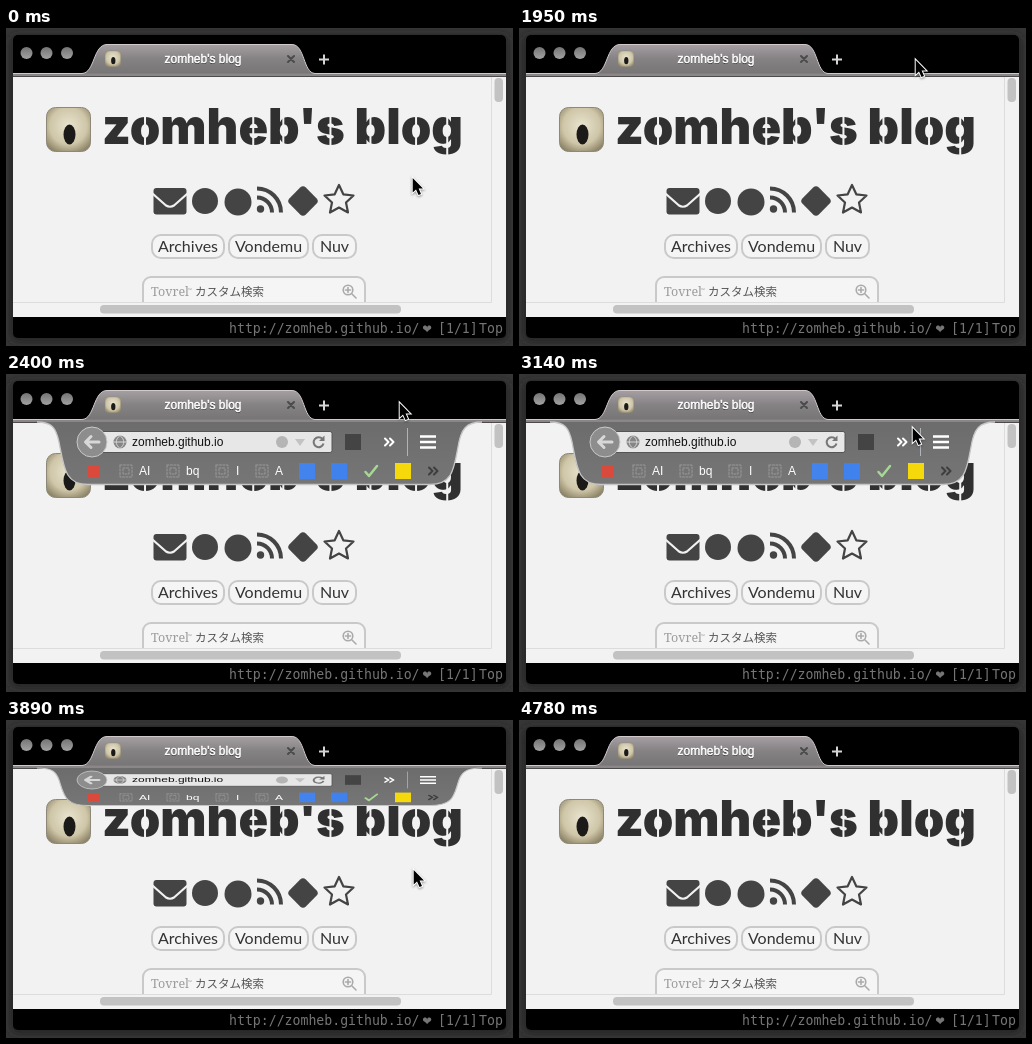
An HTML page that plays this animation: 507 px wide and 318 px high, repeating every 5.69 s.

```html
<!DOCTYPE html>
<html lang="ja">
<head>
<meta charset="utf-8">
<title>Hidden toolbar</title>
<style>
  html, body { margin: 0; width: 100%; height: 100%; overflow: hidden; background: #343434; }
  svg { display: block; width: 507px; height: 318px; }
  text { white-space: pre; }
  .sans { font-family: "Liberation Sans", Arial, sans-serif; }
  .title { font: 900 49px Inter, sans-serif; fill: #303030; }
  .button { font: 16px Lato, sans-serif; fill: #333; text-anchor: middle; }
  .outline { fill: #f5f5f5; stroke: #c9c9c9; stroke-width: 2; }
  .status { font: 13.2px "DejaVu Sans Mono", monospace; fill: #757575; }
  .bookmark { font-size: 12px; fill: #fff; }
  .line { fill: none; stroke-linecap: round; stroke-linejoin: round; }

  .toolbar, .cursor { animation: 5690ms step-end infinite; }
  .toolbar { animation-name: toolbar; transform-origin: 0 0; }
  .cursor { animation-name: cursor; filter: drop-shadow(0 1px 1px #0006); }

  @keyframes toolbar {
    0% { transform: scaleY(0); }
    36.90% { transform: scaleY(.7); }
    39.54% { transform: scaleY(1); }
    65.72% { transform: scaleY(.93); }
    68.36% { transform: scaleY(.6); }
    71.00% { transform: scaleY(.18); }
    73.63%, 100% { transform: scaleY(0); }
  }
  @keyframes cursor {
    0% { transform: translate(406px, 149px); }
    26.36% { transform: translate(406px, 140px); }
    28.99% { transform: translate(403px, 79px); }
    31.63% { transform: translate(399px, 44px); }
    34.27% { transform: translate(396px, 31px); }
    36.90% { transform: translate(396px, 28px); }
    42.17% { transform: translate(393px, 28px); }
    55.18% { transform: translate(393px, 53px); }
    57.82% { transform: translate(401px, 72px); }
    60.45% { transform: translate(405px, 131px); }
    63.09% { transform: translate(407px, 140px); }
    65.72% { transform: translate(407px, 149px); }
    76.09% { transform: translate(452px, 255px); }
    78.73% { transform: translate(467px, 292px); }
    81.37% { transform: translate(468px, 297px); visibility: visible; }
    84.00%, 100% { transform: translate(468px, 297px); visibility: hidden; }
  }
</style>
</head>
<body>
<svg viewBox="0 0 507 318">
  <defs>
    <linearGradient id="tab" x2="0" y2="1">
      <stop offset="0" stop-color="#a59fa2"/><stop offset=".5" stop-color="#858284"/><stop offset="1" stop-color="#777576"/>
    </linearGradient>
    <linearGradient id="panel" x2="0" y2="1">
      <stop offset="0" stop-color="#6c6c6c"/><stop offset="1" stop-color="#767676"/>
    </linearGradient>
    <linearGradient id="lamp" x2="0" y2="1">
      <stop offset="0" stop-color="#747474"/><stop offset="1" stop-color="#a2a2a2"/>
    </linearGradient>
    <radialGradient id="photo" cy=".42" r=".7">
      <stop offset="0" stop-color="#e9e4d0"/><stop offset=".6" stop-color="#cfc6a8"/><stop offset="1" stop-color="#81775c"/>
    </radialGradient>
    <filter id="shade" x="-10%" y="-10%" width="120%" height="120%"><feGaussianBlur stdDeviation="4"/></filter>
    <clipPath id="page"><rect x="7" y="49" width="479" height="225"/></clipPath>
    <g id="avatar">
      <rect width="44" height="44" rx="9" fill="url(#photo)" stroke="#8d8878"/>
      <ellipse cx="23" cy="27" rx="6" ry="10" fill="#1c1a18"/>
    </g>
    <g id="blank" class="line" stroke="#999" stroke-dasharray="2 1.5">
      <rect x="-6" y="-6" width="12" height="12"/><rect x="-3" y="-3" width="6" height="6"/>
    </g>
    <path id="more" class="line" stroke-width="2" d="M-5-3.5L-1.5 0L-5 3.5M0-3.5L3.5 0L0 3.5"/>
  </defs>

  <rect width="507" height="318" fill="#363636"/>
  <rect x="5" y="8" width="497" height="305" rx="6" fill="#202020" filter="url(#shade)"/>
  <rect x="7" y="7" width="493" height="303" rx="5"/>

  <!-- Title bar -->
  <g fill="url(#lamp)">
    <circle cx="20.5" cy="25" r="6"/><circle cx="40.5" cy="25" r="6"/><circle cx="61" cy="25" r="6"/>
  </g>
  <rect x="7" y="45" width="493" height="3" fill="#8b8688"/>
  <path d="M7 45.5H76C89 45 87 16.5 101 16.5H286C299 16.5 297 45 309 45.5H500" fill="url(#tab)" stroke="#d0c8cb"/>
  <rect x="7" y="48" width="493" height="1" fill="#4c4a4b"/>
  <use href="#avatar" transform="translate(99 23) scale(.36)"/>
  <g class="sans" font-size="12" text-anchor="middle">
    <text x="197" y="36" fill="#333">zomheb's blog</text>
    <text x="197" y="35" fill="#fff" stroke="#fff" stroke-width=".5">zomheb's blog</text>
  </g>
  <path class="line" d="M282 28l6 6m0-6l-6 6" stroke="#4b4b4b" stroke-width="2"/>
  <path d="M313 31.5h10m-5-5v10" stroke="#d5d5d5" stroke-width="2"/>

  <!-- Page -->
  <rect x="7" y="49" width="493" height="240" fill="#f2f2f2"/>
  <g clip-path="url(#page)">
    <use href="#avatar" x="40.5" y="79.5"/>
    <text class="title" id="title" x="96" y="115.5">zomheb's blog</text>
    <g id="slits" fill="#f2f2f2"></g>

    <g fill="#444">
      <rect x="147.5" y="160" width="33" height="26.5" rx="3"/>
      <path class="line" d="M147 166L160 177.5Q164 180 168 177.5L181 166" stroke="#f2f2f2" stroke-width="2.2"/>
      <circle cx="199" cy="173" r="13"/>
      <circle cx="232" cy="174" r="13.5"/>
      <circle cx="254.5" cy="181" r="3.7"/>
      <path d="M251 169.5a15 15 0 0 1 15 15M251 160.5a24 24 0 0 1 24 24" fill="none" stroke="#444" stroke-width="4"/>
      <rect x="285.5" y="161.500" width="23" height="23" rx="4" transform="rotate(45 297 173)"/>
      <path class="line" d="M333 157l4.3 9.3 10.2 1.2-7.5 7 2 10-9-5-9 5 2-10-7.5-7 10.2-1.2z" stroke="#444" stroke-width="2.2"/>
    </g>

    <g class="outline">
      <rect x="146" y="207" width="72" height="23" rx="9"/>
      <rect x="223" y="207" width="79" height="23" rx="9"/>
      <rect x="307" y="207" width="43" height="23" rx="9"/>
      <rect x="137" y="249" width="222" height="40" rx="8"/>
    </g>
    <g class="button">
      <text x="182" y="224">Archives</text><text x="262.5" y="224">Vondemu</text><text x="328.5" y="224">Nuv</text>
    </g>
    <text x="145" y="268" font-size="12.5" font-family="'Noto Serif', serif" fill="#9c9c9c">Tovrel</text>
    <text x="182" y="264" font-size="5" font-family="'Noto Sans', sans-serif" fill="#9c9c9c">™</text>
    <text x="189" y="267.5" font-size="11.5" font-family="'Noto Sans CJK JP', 'Noto Sans CJK', sans-serif" fill="#555">カスタム検索</text>
    <g class="line" stroke="#aaa" stroke-width="1.6">
      <circle cx="342" cy="262" r="4.8"/><path d="M346 266l4 4M339.5 262h5m-2.5-2.5v5"/>
    </g>
  </g>
  <path d="M7 274.5H485.5V49" fill="none" stroke="#dcdcdc"/>
  <g fill="#c2c2c2">
    <rect x="488.5" y="50" width="8.5" height="24" rx="4"/><rect x="94" y="277" width="301" height="8.5" rx="4"/>
  </g>

  <g class="status">
    <text x="223" y="305">http://zomheb.github.io/</text>
    <text x="416.5" y="305" font-size="15">❤</text>
    <text x="432" y="305">[1/1]</text>
    <text x="473" y="305">Top</text>
  </g>

  <!-- Drop-down toolbar, drawn from its top edge -->
  <g transform="translate(0 48)"><g class="toolbar"><g transform="translate(0 -48)">
    <path d="M31 48C46 48 50 54 53 68C58 94 59 110.5 82 110.5H424C447 110.5 448 94 452 73C455 55 460 48 476 48" fill="url(#panel)" stroke="#c6c6c6" stroke-width="1.3"/>
    <rect x="94" y="57.5" width="232" height="21" rx="2" fill="#e7e7e7" stroke="#555"/>
    <circle cx="86" cy="68" r="15" fill="#8d8d8d" stroke="#c9c9c9"/>
    <path class="line" d="M93 68H80m5-5.5L79.5 68l5.5 5.5" stroke="#d8d8d8" stroke-width="3"/>
    <circle cx="114" cy="68" r="6.5" fill="#858585"/>
    <path d="M107.5 68h13M114 61.5c-5 4-5 9 0 13c5-4 5-9 0-13" fill="none" stroke="#d5d5d5"/>
    <text class="sans" x="126" y="72" font-size="12" fill="#111">zomheb.github.io</text>
    <circle cx="276" cy="68" r="6" fill="#b5b5b5"/>
    <path d="M289 65h10l-5 7z" fill="#c3c3c3"/>
    <path d="M316.5 65a5 5 0 1 0 1 4.5" fill="none" stroke="#777" stroke-width="2"/>
    <path d="M318.5 61.5v5.5h-5.5z" fill="#777"/>
    <rect x="339" y="60" width="16" height="16" fill="#444"/>
    <use href="#more" x="384" y="68" stroke="#fff"/>
    <path d="M401.5 54v28" stroke="#aeb4ba"/>
    <path d="M414 62.5h16m-16 5.500h16m-16 5.500h16" stroke="#fff" stroke-width="2.5"/>

    <rect x="82" y="91" width="12" height="12" fill="#d94a3d"/>
    <use href="#blank" x="120" y="97"/><use href="#blank" x="167" y="97"/>
    <use href="#blank" x="216" y="97"/><use href="#blank" x="256" y="97"/>
    <g class="sans bookmark">
      <text x="133" y="101">AI</text><text x="180" y="101">bq</text>
      <text x="230" y="101">I</text><text x="269" y="101">A</text>
    </g>
    <rect x="293" y="89" width="16" height="16" fill="#4383ee"/>
    <rect x="325" y="89" width="16" height="16" fill="#3f82ed"/>
    <path class="line" d="M359.5 98l3.500 4 8-10" stroke="#a6d894" stroke-width="2.5"/>
    <rect x="389" y="89" width="16" height="16" fill="#f5d90a"/>
    <use href="#more" x="428" y="97" stroke="#3e3e3e"/>
  </g></g></g>

  <g class="cursor">
    <path d="M.7 1V15.5L4 12.4L6.5 18L9 16.9L6.6 11.4H11Z" stroke="#fff" stroke-width="2" paint-order="stroke"/>
  </g>
</svg>
<script>
  // Stencil cuts through the round letters of the heading.
  const title = document.getElementById("title");
  const slits = document.getElementById("slits");
  [...title.textContent].forEach((letter, i) => {
    if (!"oebsg".includes(letter)) return;
    const box = title.getExtentOfChar(i);
    const slit = document.createElementNS(title.namespaceURI, "rect");
    const attrs = { x: box.x + box.width / 2 - 1, y: 87, width: 2, height: letter === "g" ? 40 : 30 };
    for (const name in attrs) slit.setAttribute(name, attrs[name]);
    slits.append(slit);
  });
</script>
</body>
</html>
```
